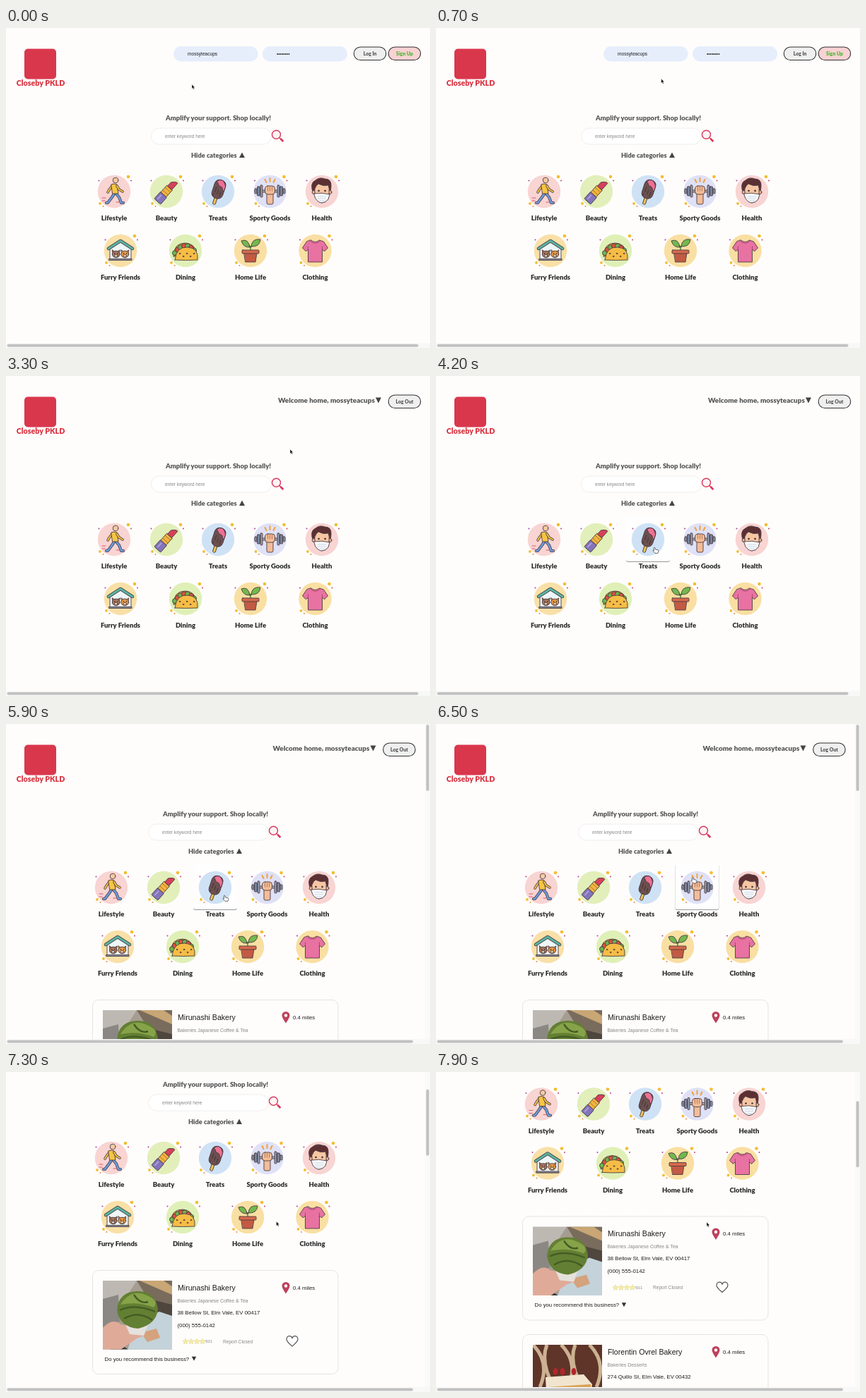
Animation of 600 by 454 pixels, one loop 8000 ms. Source, as an HTML page:

```html
<!DOCTYPE html>
<html lang="en">
<head>
<meta charset="utf-8">
<title>Local shop finder</title>
<style>
  html, body { margin: 0; width: 100%; height: 100%; overflow: hidden; background: #fefdfc; }
  svg { display: block; width: 600px; height: 454px; }
  text { font-family: "Liberation Sans", Arial, sans-serif; font-size: 7.8px; fill: #1c1c1c; white-space: pre; }
  .round { font-family: Lato, sans-serif; font-weight: 900; font-size: 9.5px; fill: #555; }
  .mid { text-anchor: middle; }
  .label { fill: #2b2b2b; }
  .field { font-size: 6.6px; }
  .button rect { fill: #efefef; stroke: #333; stroke-width: 1.1; }
  .button text { font-size: 6.9px; }
  .signup rect { fill: #f9d2d3; }
  .signup text { fill: #45b82f; }
  .icon { stroke: #4b3b42; stroke-width: .9; stroke-linejoin: round; stroke-linecap: round; }
  .grey { fill: #888; }
  #hover { fill: #fefefe; filter: drop-shadow(0 1.2px .5px rgba(0, 0, 0, .4)); }
</style>
</head>
<body>
<svg id="stage" viewBox="0 0 600 454"></svg>
<script>
const LOOP = 8000, STEP = 100, LOGIN = 2300, RESULTS = 5900;
const USER = 'mossyteacups';

// [time, x, y] of the pointer tip and [time, offset] of the page
const pointerPath = [
  [0, 263, 80], [400, 263, 80], [1300, 430, 56], [1700, 430, 56], [2200, 513, 36],
  [2900, 513, 36], [3300, 402, 104], [3800, 312, 236], [4200, 309, 243],
  [5900, 309, 243], [6700, 381, 209], [7000, 381, 209], [7400, 383, 213]
];
const scrollPath = [
  [0, 0], [6700, 0], [7000, 44.5], [7200, 95], [7400, 125],
  [7700, 125], [7800, 150], [7900, 186.5]
];

const rect = (x, y, w, h, fill, r = 0) =>
  `<rect x="${x}" y="${y}" width="${w}" height="${h}" rx="${r}" fill="${fill}"/>`;
const dot = (x, y, r, fill, ry = r) =>
  `<ellipse cx="${x}" cy="${y}" rx="${r}" ry="${ry}" fill="${fill}"/>`;
const path = (d, fill = 'none', more = '') => `<path d="${d}" fill="${fill}" ${more}/>`;
const line = (d, color, w) => path(d, 'none', `stroke="${color}" stroke-width="${w}"`);
const limb = (d, color, w = 3.2) => line(d, '#4b3b42', w + 1.5) + line(d, color, w);
const text = (x, y, str, cls = '', size) =>
  `<text x="${x}" y="${y}" class="${cls}"${size ? ` style="font-size:${size}px"` : ''}>${str}</text>`;
const group = (x, y, body) => `<g transform="translate(${x} ${y})">${body}</g>`;
const turn = (deg, body) => `<g transform="rotate(${deg})">${body}</g>`;
const button = (x, str, cls = '') =>
  `<g class="button ${cls}">${rect(x, 27, 45.5, 18.5, '', 9.2)}${text(x + 22.8, 38.8, str, 'round mid')}</g>`;

const walker =
  limb('M-2-9L-6-4-9 1', '#f6c542', 2) + limb('M1 2L-3 8-9 16H-11', '#6c9bdb', 2.6) +
  limb('M2 2L7 8 10 16H13', '#6c9bdb', 2.6) + path('M-4-10Q0-12 4-10L6 3H-2Z', '#f6c542') +
  limb('M4-8L7-3 12 0', '#f6c542', 2) + dot(2, -16, 3.8, '#f4c9a0') +
  line('M-17 9h5M-17 13h4M3 15h4', '#e0566e', 1);

const lipstick = turn(42,
  rect(-6, 6, 12, 13, '#8474bd', 1) + line('M-2 9V16', '#b2a6dc', 1.6) +
  rect(-5, -7, 10, 13, '#f3b53f') + line('M-5-3H5M-5 2H5', '#9a6a2c', .8) +
  path('M-4-7V-14Q2-21 4-19V-7Z', '#d8405a'));

const popsicle = turn(18,
  rect(-2, 8, 4, 11, '#f3c352', 1.5) + rect(-8, -17, 16, 27, '#6c5050', 7) +
  path('M-6-13Q-4-17 0-17T8-10V-3Q6-2 5-5T1-8-2-9-6-13Z', '#ee6f93') +
  line('M-4-5V2M0-2V4M4 0V6M-5 5V7', '#493536', 1.1));

const weights = [-1, 1].map(s =>
  rect(s * 20 - 1.5, -4, 3, 7, '#8b95a7', 1) + rect(s * 16 - 2, -7, 4, 13, '#77829a', 1) +
  rect(s * 12 - 1.5, -9, 3, 17, '#96a1b3', 1)).join('');
const dumbbell =
  line('M0-19V-14M-7-17L-5-13M7-17L5-13', '#f2a13a', 2) +
  rect(-4.5, 2, 9, 16, '#f3bd98', 2) + rect(-21, -2, 42, 3, '#aab3c2') + weights +
  rect(-7, -8, 14, 12, '#f3bd98', 4) + line('M-3-7V-1M0-7V-1M3-7V-1', '#a46b55', .8);

const patient =
  path('M-12 3Q-18-12-9-16-3-21 4-18 14-18 13-7L12 3Z', '#5c3033') +
  dot(-11.5, 1, 2.4, '#f0b592') + dot(11.5, 1, 2.4, '#f0b592') +
  path('M-10-4Q-8-9-5-11 2-7 9-9 11-5 10 2 10 15 0 16-10 14-10 0Z', '#f6c6a3') +
  path('M-11 3Q0 1 11 4L9 11Q5 16 0 16T-9 10Z', '#f8fbff') +
  line('M-6 7H6M-6 10H6M-4 13H4', '#b6c5d2', .7) +
  dot(-4.5, -1, .9, '#3a2428') + dot(4.5, -1, .9, '#3a2428');

const petFace = (x, fill) =>
  path(`M${x - 5.5}-1l1 6h9l1-6-3.5 2h-4Z`, fill) + dot(x, 5, 5.4, fill, 4.8) +
  dot(x, 7.3, 2.4, '#f7e4cc', 1.6) + dot(x - 2, 4, .4, '#333') + dot(x + 2, 4, .4, '#333');
const kennel =
  path('M-15 13V-4L0-13 15-4V13Z', '#eef6f8') + petFace(-6.3, '#a9765a') + petFace(6.3, '#e69a43') +
  limb('M-17-3L0-14 17-3', '#59b4a2', 3) + rect(-16, 11.5, 32, 2, '#8d99a6');

const taco =
  path('M-17 8Q-17-11 0-11 13-10 15 2Z', '#f1b13e') +
  [-15, -11, -7, -2, 3, 8, 12].map((x, i) =>
    dot(x, x * x / 22 - 7, 3.5, i % 2 ? '#e2503e' : '#69b84c')).join('') +
  path('M-15 13Q-13-6 3-5T17 13Q0 14-15 13Z', '#f6bd45') +
  [-8, -3, 2, 7, 12].map((x, i) => dot(x, 4 + i % 2 * 4, .8, '#d68b2b')).join('');

const plant =
  line('M0 0V-5Q-1-8-5-9M0-4Q1-8 6-10', '#4b7d3c', 1.4) +
  path('M-1-5Q-10-4-13-14-3-18-1-5Z', '#72b84f') + path('M1-6Q2-18 14-16 13-5 1-6Z', '#72b84f') +
  path('M-9 3H9L7 16H-7Z', '#c35a43') + rect(-12, -1, 24, 5, '#d5694b', 1);

const shirt =
  path('M-6-15Q0-10 6-15L12-13 18-4 13 1 10-2V16H-10V-2L-13 1-18-4-12-13Z', '#e872a2') +
  line('M-7-14Q0-7 7-14M10-2V-6M-10-2V-6', '#9c3f68', .8);

const categories = [
  ['Lifestyle', 153, 232, '#f8d4d2', walker],
  ['Beauty', 227, 232, '#e2efba', lipstick],
  ['Treats', 300, 232, '#cfe2f5', popsicle],
  ['Sporty Goods', 373.5, 232, '#dfe1f7', dumbbell],
  ['Health', 447, 232, '#f8d4d2', patient],
  ['Furry Friends', 162, 316, '#f9e0a7', kennel],
  ['Dining', 254, 316, '#dff0b7', taco],
  ['Home Life', 346, 316, '#f9dfa2', plant],
  ['Clothing', 437.5, 316, '#f9dfa2', shirt]
];
const confetti = dot(20, -21, 2.3, '#f4bd2f') + dot(24, -15.5, 1, '#c8456f') +
  dot(-21.5, -15.5, 1.1, '#b2519a') + dot(-20, 17, 1.9, '#f4bd2f') + dot(-15.5, 21, 1, '#e98a3c');
const category = ([name, x, y, fill, art]) =>
  group(x, y, dot(0, 0, 23.2, fill) + confetti + `<g class="icon">${art}</g>`) +
  text(x, y + 41.3, name, 'round mid label');

const bun =
  rect(0, 0, 98, 98, '#a69d90') + path('M0 0H48L26 34 0 50Z', '#bdb9b2') +
  path('M0 26L22 20 24 58 0 66Z', '#8b8883') + path('M48 0H98V50L76 45Z', '#796c5c') +
  path('M52 0L98 20V8L86 0Z', '#c8a675') + path('M74 28L98 34V50L78 46Z', '#4f463e') +
  path('M48 60L80 44 98 50V98H35Z', '#c4d2da') + path('M54 74l22-6 5 13-18 6Z', '#d4a27d') +
  path('M10 98Q20 84 36 98Z', '#3d3b3b') +
  path('M0 67Q14 52 25 62L60 68Q66 76 48 82L25 98H0Z', '#dfab98') +
  path('M32 62L64 62 58 78 38 76Z', '#e5e1dc') +
  path('M20 42Q22 16 48 15T78 40Q76 62 50 68 24 66 20 42Z', '#637f33') +
  path('M25 34Q39 12 60 20T72 38Q50 29 25 34Z', '#87a349') +
  line('M24 42Q45 32 74 44M30 54Q50 42 70 56M44 20Q53 34 64 30', '#445d24', 2.4);
const cake =
  rect(0, 0, 98, 98, '#5e3528') +
  [0, 20, 40, 60, 80, 100].map((x, i) =>
    line(`M${x - 20} 0q${i % 2 ? 25 : -10} 25 10 60`, '#cbb292', 5)).join('') +
  path('M18 46L72 42 84 56 80 84 20 86Z', '#f1e5d0') + path('M20 60L82 56V62L20 67Z', '#d9a254') +
  [32, 42, 58].map(x => dot(x, 38, 3.4, '#b5252b', 5)).join('') + line('M22 74L80 69', '#b8463b', 3);

const star = x => path(`M${x} 96.5l1.2 2.7 3 .3-2.2 2 .6 2.9-2.6-1.5-2.6 1.5.6-2.9-2.2-2 3-.3Z`,
  '#f4ecA0', 'stroke="#d8cf90" stroke-width=".4"');
const result = (top, photo, name, kind, address, phone, votes) => group(122.5, top,
  `<rect width="347.5" height="147" rx="9" fill="#fefdfc" stroke="#cfcccb" stroke-width=".7" stroke-dasharray="2 .7"/>` +
  `<svg x="14.5" y="14.5" width="98" height="97.5">${photo}</svg>` +
  text(120.5, 28, name, '', 10.6) + text(120, 45, kind, 'grey', 6.9) +
  text(120, 62, address) + text(120, 80, phone) +
  path('M273.5 33Q268 25 268 22a5.5 5.5 0 0 1 11 0Q279 25 273.5 33Z', '#bd415b') + dot(273.5, 22, 2.2, '#fff') +
  text(283.5, 27, '0.4 miles') +
  [131.5, 139.5, 147.5, 155.5].map(star).join('') + text(159.5, 102.6, votes, 'grey', 6) +
  text(184.5, 103, 'Report Closed', 'grey', 6.6) +
  path('M282.5 107.5Q274.5 101 274.5 97.5C275 92 281 92 282.5 96 284 92 290 92 290.5 97.5Q290.5 101 282.5 107.5Z',
    '#fff', 'stroke="#555" stroke-width="1.2"') +
  text(17, 128.2, 'Do you recommend this business?') + path('M140.3 122.3h6.4l-3.2 6Z', '#333'));

document.getElementById('stage').innerHTML = `
  <rect width="600" height="454" fill="#fefdfc"/>
  <g id="page">
    ${rect(26, 29.5, 45, 43, '#d9374c', 5)}
    <text x="49" y="81.5" class="round mid" style="font-size:10.7px;fill:#d8323f">Closeby PKLD</text>
    <g id="guest">
      ${rect(237, 26, 119.5, 21.5, '#e6eefc', 10.7)}${text(257, 39, USER, 'field')}
      ${rect(363, 26, 120, 21.5, '#e6eefc', 10.7)}${text(383, 39, '••••••••', 'field')}
      ${button(492.3, 'Log In')}${button(541.2, 'Sign Up', 'signup')}
    </g>
    <g id="member">
      ${text(385, 38.3, 'Welcome home, ' + USER, 'round', 9.9)}${path('M523 30.5h8l-4 8Z', '#444')}
      ${button(541.2, 'Log Out')}
    </g>
    <g id="main">
      ${text(300.5, 131, 'Amplify your support. Shop locally!', 'round mid')}
      <rect x="205.5" y="142" width="170" height="23" rx="11.5" fill="#fff" stroke="#ece9e8" stroke-width=".8"/>
      ${text(225, 156, 'enter keyword here', 'field grey')}
      <circle cx="382.5" cy="151.2" r="6" fill="#fdf3f5" stroke="#d93a5e" stroke-width="1.4"/>
      ${line('M386.8 155.5l2 2', '#d93a5e', 1.3)}${line('M388.4 157.1l4 4', '#d93a5e', 2.8)}
      ${text(262, 183.5, 'Hide categories', 'round', 9.2)}${path('M330 184h8l-4-7.5Z', '#444')}
      <rect id="hover" width="62" height="65" rx="3"/>
      ${categories.map(category).join('')}
    </g>
    <g id="results">
      ${result(391.5, bun, 'Mirunashi Bakery', 'Bakeries Japanese Coffee &amp; Tea', '38 Bellow St, Elm Vale, EV 00417', '(000) 555-0142', '931')}
      ${result(559, cake, 'Florentin Ovrel Bakery', 'Bakeries Desserts', '274 Quillo St, Elm Vale, EV 00432', '(000) 555-0167', '804')}
    </g>
  </g>
  <g id="sidebar">${rect(593, 0, 7, 454, '#fafafa')}<rect id="thumb" x="594.5" width="4.2" height="94" rx="2.1" fill="#c1c1c1"/></g>
  ${rect(0, 447, 600, 7, '#f8f8f8')}
  <rect id="bottom" x="1.5" y="448.4" height="4.2" rx="2.1" fill="#c1c1c1"/>
  <g id="pointer">
    <path id="arrow" d="M0 0V6.2L1.5 4.9 2.5 7.2 3.5 6.7 2.6 4.5H4.4Z" fill="#111" stroke="#fff" stroke-width=".4"/>
    <path id="hand" d="M-.8.8Q0-.6.9.6L1.6 3 5 3.8Q6.3 4.2 5.8 6L5 8.4H1L-2 5Q-2.2 3.6-.3 4.4Z" fill="#fff" stroke="#333" stroke-width=".7"/>
  </g>`;

const $ = id => document.getElementById(id);
const show = (id, on) => $(id).setAttribute('display', on ? 'inline' : 'none');
const move = (id, x, y) => $(id).setAttribute('transform', `translate(${x} ${y})`);

function at(keys, t) {
  const next = keys.findIndex(k => k[0] > t);
  if (next < 0) return keys[keys.length - 1].slice(1);
  const a = keys[next - 1], b = keys[next], p = (t - a[0]) / (b[0] - a[0]);
  return a.slice(1).map((v, i) => v + (b[i + 1] - v) * p);
}

function draw(t) {
  const [x, y] = at(pointerPath, t), [scroll] = at(scrollPath, t);
  const member = t >= LOGIN, found = t >= RESULTS, shift = found ? -4 : 0;
  const over = categories.find(([, cx, cy]) =>
    Math.abs(x - shift - cx) < 31 && y + scroll > cy - 34 && y + scroll < cy + 31);
  const onLogin = !member && x > 492 && x < 538 && y > 27 && y < 46;

  show('guest', !member);
  show('member', member);
  show('results', found);
  show('sidebar', found);
  show('hover', over);
  if (over) move('hover', over[1] - 31, over[2] - 34);
  show('hand', over || onLogin);
  show('arrow', !over && !onLogin);

  move('pointer', x, y);
  move('page', 0, -scroll);
  move('main', shift, 0);
  move('member', found ? -7.5 : 0, 0);
  $('thumb').setAttribute('y', 1 + scroll * .216);
  $('bottom').setAttribute('width', found ? 574.5 : 582);
}

const start = performance.now();
function tick() {
  const t = (performance.now() - start) % LOOP;
  draw(Math.floor(t / STEP) * STEP);
  requestAnimationFrame(tick);
}
tick();
</script>
</body>
</html>
```
